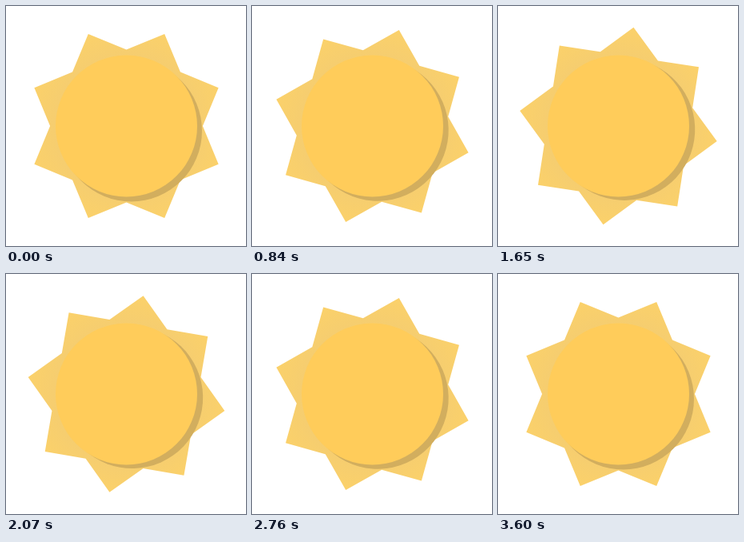
An HTML page for the animation above (3.63 s loop, 300 by 300 pixels).

```html
<!DOCTYPE html>
<html lang="en">
<head>
<meta charset="utf-8">
<title>Sun</title>
<style>
  html, body { margin: 0; width: 100%; height: 100%; overflow: hidden; background: #fff; }
  svg { display: block; width: 100vw; height: 100vh; }
</style>
</head>
<body>
<svg viewBox="0 0 300 300">
  <defs>
    <radialGradient id="glow" gradientUnits="userSpaceOnUse" cx="0" cy="0" r="125">
      <stop offset=".68" stop-color="#f5cd70"/>
      <stop offset="1" stop-color="#fbd16a"/>
    </radialGradient>
  </defs>
  <g transform="translate(150.5 150)">
    <g id="spin">
      <path id="rays" fill="url(#glow)"/>
      <circle cx="6" cy="6" r="88.5" fill="#d2ae5e"/>
    </g>
    <circle r="88.5" fill="#ffcc5a"/>
  </g>
</svg>
<script>
  const STEP = 30, LOOP = 3630, TURN = 1800, SWING = 15;
  const TIP = 124.6, NOTCH = 95.4;
  const spin = document.getElementById('spin');

  // Eight tips alternating with notches; a notch points straight up.
  const points = Array.from({ length: 16 }, (_, i) => {
    const a = i * Math.PI / 8;
    const r = i % 2 ? TIP : NOTCH;
    return (r * Math.sin(a)).toFixed(2) + ' ' + (-r * Math.cos(a)).toFixed(2);
  });
  document.getElementById('rays').setAttribute('d', 'M' + points.join('L') + 'Z');

  function draw(ms) {
    const t = Math.floor((ms % LOOP) / STEP) * STEP;
    const angle = -SWING * (1 - Math.abs(t - TURN) / TURN);
    spin.setAttribute('transform', `rotate(${angle})`);
  }

  const start = performance.now();
  function tick() {
    draw(performance.now() - start);
    requestAnimationFrame(tick);
  }
  draw(0);
  requestAnimationFrame(tick);
</script>
</body>
</html>
```
